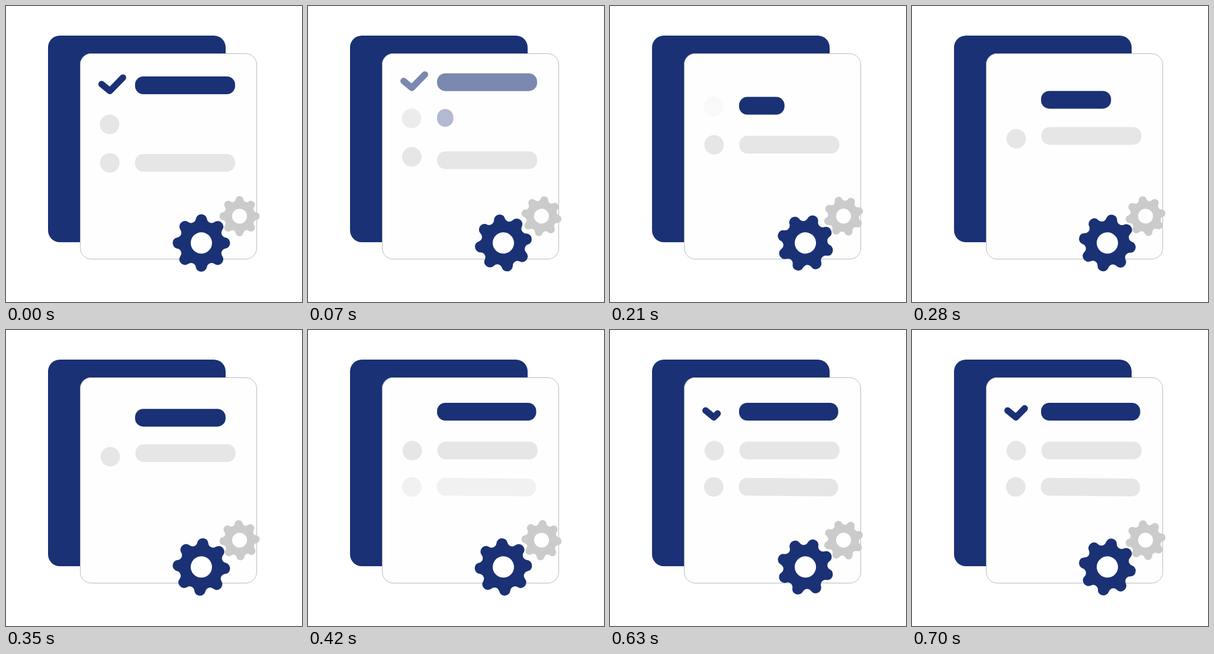
An HTML page with a canvas for the animation above (0.91 s loop, 500x500 px).

```html
<!DOCTYPE html>
<html lang="en">
<head>
<meta charset="utf-8">
<title>Checklist</title>
<style>
  html, body { margin: 0; width: 100%; height: 100%; overflow: hidden; background: #fff; }
  canvas { display: block; }
</style>
</head>
<body>
<canvas id="stage" width="500" height="500"></canvas>
<script>
const ctx = document.getElementById('stage').getContext('2d');
const BLUE = '#1a3175', GREY = '#e6e6e6', SILVER = '#cbcbcb', EDGE = '#b8bbc4';
const STEP = 70, LOOP = 910, STEPS = 11;

const clamp = v => Math.max(0, Math.min(1, v));
const smooth = v => { v = clamp(v); return v * v * (3 - 2 * v); };

function box(x, y, w, h, r, color, alpha = 1) {
  ctx.globalAlpha = alpha;
  ctx.fillStyle = color;
  ctx.beginPath();
  ctx.roundRect(x, y, w, h, r);
  ctx.fill();
  ctx.globalAlpha = 1;
}

const bar = (x, y, w, color, alpha) => box(x, y, w, 30, Math.min(14, w / 2), color, alpha);
const dot = (x, y, alpha) => box(x - 16.5, y - 16.5, 33, 33, 16.5, GREY, alpha);

function check(y, length, alpha = 1) {
  ctx.save();
  ctx.globalAlpha = alpha;
  ctx.strokeStyle = BLUE;
  ctx.lineWidth = 11;
  ctx.lineCap = ctx.lineJoin = 'round';
  ctx.setLineDash([length, 99]);
  ctx.beginPath();
  ctx.moveTo(161.5, y + 13);
  ctx.lineTo(175.5, y + 24.5);
  ctx.lineTo(197.5, y + 2);
  ctx.stroke();
  ctx.restore();
}

// Eight round teeth joined by tangent concave arcs.
function gear(x, y, scale, angle, color) {
  const tooth = 9.5, gap = 8, toothDist = 39, gapDist = 45.2, half = Math.PI / 8;
  const dx = gapDist * Math.sin(half), dy = gapDist * Math.cos(half) - toothDist;
  const side = Math.atan2(dx, dy);
  ctx.save();
  ctx.translate(x, y);
  ctx.scale(scale, scale);
  ctx.rotate(angle);
  ctx.fillStyle = color;
  ctx.beginPath();
  for (let i = 0; i < 8; i++) {
    const a = i * 2 * half - Math.PI / 2, b = a + half;
    ctx.arc(toothDist * Math.cos(a), toothDist * Math.sin(a), tooth, a - side, a + side);
    ctx.arc(gapDist * Math.cos(b), gapDist * Math.sin(b), gap,
      a + side - Math.PI, a + 2 * half - side + Math.PI, true);
  }
  ctx.fill();
  ctx.fillStyle = '#fff';
  ctx.beginPath();
  ctx.arc(0, 0, 18, 0, 2 * Math.PI);
  ctx.fill();
  ctx.restore();
}

function sheets() {
  box(71, 50, 300, 349, 20, BLUE);
  box(125, 80, 299, 348, 19, '#fefefe');
  ctx.strokeStyle = EDGE;
  ctx.lineWidth = 1;
  ctx.beginPath();
  ctx.roundRect(125.5, 80.5, 298, 347, 18.5);
  ctx.stroke();
}

function rows(s) {
  const climb = 10.2 * Math.min(s, 6);

  // Finished row leaves upwards.
  const topY = 119 - 5.3 * s * s;
  const topAlpha = clamp(1 - s / 3) ** 1.4;
  check(topY, 99, topAlpha);
  bar(218, topY, 169, BLUE, topAlpha);

  // Second row fills up, takes the first place and gets its check mark.
  dot(175, 200 - climb, clamp(1 - s / 4));
  if (s > 0) bar(218, 184.2 - climb, 27.5 + 140 * smooth((s - 1) / 5), BLUE, clamp(s / 3));
  if (s > 6) check(123, 12.3 * (s - 6.8));

  // Third row moves to the second place.
  const shift = smooth(s / 6);
  dot(175.3 + .9 * shift, 265 - climb);
  bar(218 + .7 * shift, 250 - 61.5 * shift, 169, GREY);

  // New third row fades in, slightly tilted.
  const fade = clamp((s - 5) / 2);
  dot(175.3, 265, fade);
  ctx.save();
  ctx.translate(301.5, 265.4);
  ctx.rotate(.008);
  bar(-83.8, -15, 167.5, GREY, fade);
  ctx.restore();
}

function draw(time) {
  const s = Math.min(STEPS - 1, Math.floor(time % LOOP / STEP));
  const turn = s / STEPS;
  const angle = Math.PI / 2 * turn + .044 * Math.sin(2 * Math.PI * turn);
  ctx.clearRect(0, 0, 500, 500);
  sheets();
  rows(s);
  gear(394.5, 355, .7, angle, SILVER);
  gear(330, 400.3, 1, -angle, BLUE);
}

const start = performance.now();
function tick() {
  draw(performance.now() - start);
  requestAnimationFrame(tick);
}
tick();
</script>
</body>
</html>
```
